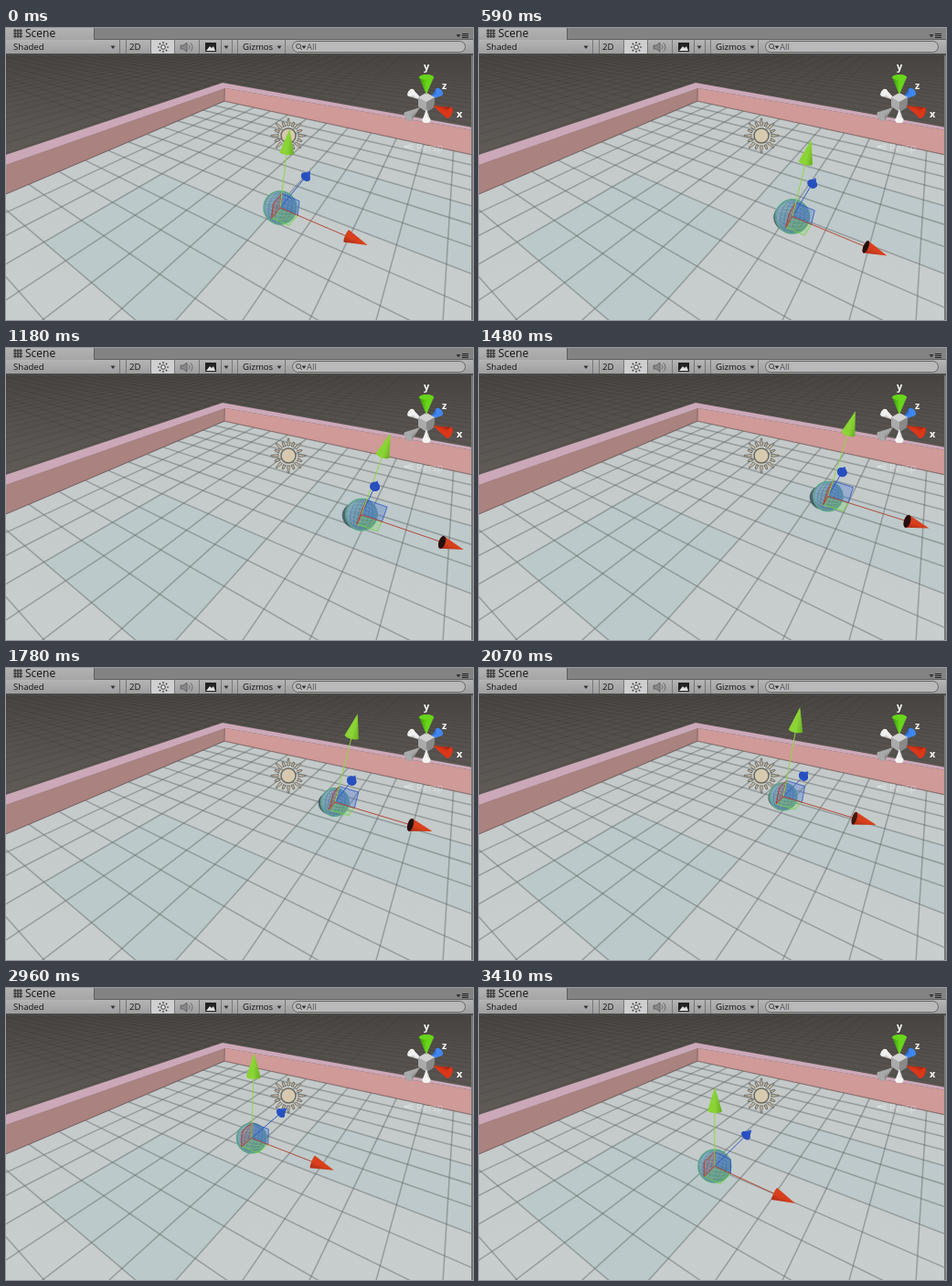
An HTML page with a canvas that plays this animation: 511x320 px, repeating every 3520 ms.

```html
<!DOCTYPE html>
<html>
<head>
<meta charset="utf-8">
<style>
html, body { margin: 0; width: 100%; height: 100%; overflow: hidden; background: #555; }
canvas { display: block; }
</style>
</head>
<body>
<canvas id="stage" width="511" height="320"></canvas>
<script>
const W = 511, H = 320, LOOP = 3520, TICK = 148.2, LEAD = 11.5;
const stage = document.getElementById('stage').getContext('2d');
const backdrop = document.createElement('canvas');
backdrop.width = W;
backdrop.height = H;
let g = backdrop.getContext('2d');

// Key points of the ball's path, three ticks apart
const keys = [
  [300, 197], [326, 206], [378, 202], [388, 172], [360, 147],
  [320, 141], [290, 153], [261, 172], [258, 204]
];

// Floor perspective: back corner, two vanishing points, tile steps
const corner = [239, 80], vanishX = [-270, -31], vanishZ = [500, -31];
const stepU = 0.03, stepV = 0.041;

const clamp = (v, lo, hi) => Math.min(hi, Math.max(lo, v));

function ballAt(tick) {
  const i = Math.floor(tick / 3), f = tick / 3 - i;
  const [a, b, c, d] = [-1, 0, 1, 2].map(k => keys[clamp(i + k, 0, keys.length - 1)]);
  return b.map((p, k) => p + f / 2 * (c[k] - a[k]
    + f * (2 * a[k] - 5 * p + 4 * c[k] - d[k] + f * (3 * (p - c[k]) + d[k] - a[k]))));
}

function floorPoint(u, v) {
  const s = u * stepU, t = v * stepV;
  return corner.map((c, i) => (c - s * vanishX[i] - t * vanishZ[i]) / (1 - s - t));
}

function trace(points, close = true) {
  g.beginPath();
  points.forEach(([x, y]) => g.lineTo(x, y));
  if (close) g.closePath();
}

function paint(fill, stroke, width) {
  if (fill) { g.fillStyle = fill; g.fill(); }
  if (stroke) { g.strokeStyle = stroke; g.lineWidth = width; g.stroke(); }
}

function poly(points, fill, stroke, width = 1) {
  trace(points);
  paint(fill, stroke, width);
}

function line(a, b, color, width = 1) {
  trace([a, b], false);
  paint(null, color, width);
}

function oval(x, y, rx, ry, angle, fill, stroke, width = 1) {
  g.beginPath();
  g.ellipse(x, y, rx, ry, angle, 0, Math.PI * 2);
  paint(fill, stroke, width);
}

function gradient(x0, y0, x1, y1, ...colors) {
  const fill = g.createLinearGradient(x0, y0, x1, y1);
  colors.forEach((c, i) => fill.addColorStop(i / (colors.length - 1), c));
  return fill;
}

function rect(x, y, w, h, fill) {
  g.fillStyle = fill;
  g.fillRect(x, y, w, h);
}

function text(str, x, y, size, color = '#111', weight = '') {
  g.font = `${weight} ${size}px "Open Sans", sans-serif`;
  g.fillStyle = color;
  g.fillText(str, x, y);
}

function cone(tip, angle, length, half, light, dark, depth, base) {
  g.save();
  g.translate(...tip);
  g.rotate(angle);
  const skin = gradient(0, -half, 0, half, light, light, dark);
  oval(-length, 0, depth, half, 0, skin);
  poly([[0, 0], [-length, -half], [-length, half]], skin);
  if (base) oval(-length, 0, depth, half, 0, base);
  g.restore();
}

function gridLines(from, to, color, width) {
  for (let i = from; i <= to; i++) {
    for (const [p, v] of [[floorPoint(i, 0), vanishZ], [floorPoint(0, i), vanishX]]) {
      const far = p.map((c, k) => c + (c - v[k]) * 12);
      line(from < 0 ? v : p, far, color, width);
    }
  }
}

function tilePatch(u0, u1, v0, v1, color) {
  poly([floorPoint(u0, v0), floorPoint(u1, v0), floorPoint(u1, v1), floorPoint(u0, v1)], color);
}

function drawRoom() {
  rect(0, 29, W, H, gradient(0, 30, 0, 140, '#4c4845', '#605b57'));
  gridLines(-28, 6, 'rgba(30,28,27,.18)', 0.8);

  g.save();
  trace([corner, [W, 139], [W, H], [0, H], [0, 182]]);
  g.clip();
  rect(0, 80, W, 240, gradient(0, 80, 0, H, '#c3c9c9', '#c8cdcd'));
  tilePatch(3, 7, 8, 12, '#bbc9ca');
  tilePatch(7, 11.5, 4, 7, '#bdc9ca');
  gridLines(0, 23, 'rgba(92,98,98,.46)', 1.5);
  g.restore();

  poly([[0, 150], [240, 66], corner, [0, 182]], '#aa8280');
  poly([[240, 66], [W, 112], [W, 139], corner], '#cf9a98');
  poly([[237, 60], [W, 109], [W, 112], [240, 66], [0, 150], [0, 139]], '#cba8b8');
  line([239, 66], corner, '#946c6d');
  line([0, 182], corner, 'rgba(80,60,60,.45)');
  line(corner, [W, 139], 'rgba(110,75,75,.45)');
  rect(509, 29, 2, H, '#777');
}

function drawSun() {
  g.save();
  g.translate(309, 118);
  for (let i = 0; i < 16; i++) {
    const reach = i % 2 ? 16 : 19;
    poly([[11, -1.4], [reach, -0.6], [reach, 0.6], [11, 1.4]], '#cfc5ae', '#625d54', 0.8);
    g.rotate(Math.PI / 8);
  }
  oval(0, 0, 8, 8, 0, '#d5cab0', '#6b655a', 1.4);
  g.restore();
}

function drawCompass() {
  const arm = (x, y, toX, toY, half, light, dark) =>
    cone([x, y], Math.atan2(y - toY, x - toX), Math.hypot(x - toX, y - toY), half, light, dark, 3, light);
  arm(457, 80, 443, 71, 4.5, '#f1f1f1', '#aaa');
  arm(462, 80, 474, 70, 5, '#3f86f0', '#2353ad');
  poly([[451, 76], [460, 71], [469, 76], [468, 87], [460, 92], [451, 86]], '#aaa');
  poly([[451, 76], [460, 71], [469, 76], [460, 81]], '#d2d2d2');
  poly([[460, 81], [469, 76], [468, 87], [460, 92]], '#898989');
  arm(460, 73, 460, 54, 8, '#68d51b', '#328d0a');
  arm(467, 85, 485, 93, 6.5, '#dc3618', '#8f1c0b');
  arm(453, 87, 440, 97, 6, '#a9a9a9', '#777');
  arm(460, 89, 460, 101, 4.5, '#f4f4f4', '#b5b5b5');
  text('y', 457, 46, 11, '#fff', 'bold');
  text('z', 477, 67, 11, '#fff', 'bold');
  text('x', 493, 98, 11, '#fff', 'bold');
  const faint = 'rgba(255,255,255,.4)';
  for (const dy of [-3, 0, 3]) line([436, 130], [446, 130 + dy], faint);
  text('Persp', 449, 135, 11, faint);
}

function arrow(x, y) {
  poly([[x - 2.5, y - 1.5], [x + 2.5, y - 1.5], [x, y + 2]], '#333');
}

function drawToolbar() {
  rect(0, 0, W, 13, '#838383');
  rect(0, 0, 97, 13, gradient(0, 0, 0, 13, '#b2b2b2', '#a5a5a5'));
  rect(96, 0, 1, 13, '#5c5c5c');
  rect(0, 13, W, 16, gradient(0, 13, 0, 29, '#b5b5b5', '#9d9d9d'));
  rect(97, 12, W, 1, '#606060');
  rect(0, 28, W, 2, '#4b4947');
  for (const d of [-3, 0, 3]) {
    line([13 + d, 1], [13 + d, 11], '#222');
    line([8, 6 + d], [18, 6 + d], '#222');
    line([499, 8.5 + d * 0.67], [506, 8.5 + d * 0.67], '#222');
  }
  text('Scene', 21, 10, 12);
  arrow(495, 8.5);

  rect(159, 13, 25, 15, '#cfcfcf');
  for (const x of [124, 131, 158, 184, 211, 235, 247, 253, 305]) rect(x, 13, 1, 15, '#777');
  text('Shaded', 8, 24, 9.6);
  text('2D', 135, 24, 9.6);
  text('Gizmos', 259, 24, 9.6);
  for (const x of [117, 241, 299]) arrow(x, 21);

  for (let i = 0; i < 8; i++) {
    const c = Math.cos(i * Math.PI / 4), s = Math.sin(i * Math.PI / 4);
    line([172 + c * 4, 21 + s * 4], [172 + c * 6, 21 + s * 6], '#333', 1.2);
  }
  oval(172, 21, 2.3, 2.3, 0, '#eee', '#333');
  poly([[191, 19], [194, 19], [198, 16], [198, 26], [194, 23], [191, 23]], '#888', '#666');
  for (const r of [3, 6]) {
    g.beginPath();
    g.arc(198, 21, r, -0.9, 0.9);
    g.stroke();
  }
  rect(218, 16, 12, 10, '#222');
  poly([[219, 25], [223, 20], [225, 22], [227, 20], [229, 25]], '#ddd');

  g.beginPath();
  g.roundRect(313.5, 14.5, 189, 12, 6);
  paint('#b9b9b9', '#666', 1);
  oval(320, 20, 2.5, 2.5, 0, null, '#444');
  line([322, 22], [324, 24], '#444');
  arrow(326, 21);
  text('All', 329, 24, 9.6, '#555');
}

function drawBall(x, y) {
  const r = 15 + (y - 141) * 0.055;
  const shade = clamp((x - 300) / 20, 0, 4);
  oval(x - shade, y + 1, r, r * 0.86, 0, 'rgba(42,68,82,.75)');
  oval(x, y, r, r, 0, gradient(x - r, y - r, x + r, y + r, '#8badbb', '#6a93a6', '#5b8582'));
  for (let k = 0.2; k < 1; k += 0.25) {
    oval(x, y, r * k, r, 0.25, null, 'rgba(50,96,160,.55)', 0.7);
    oval(x, y, r, r * k, 0.25, null, 'rgba(165,200,205,.5)', 0.7);
  }
  oval(x, y, r, r, 0, null, '#57a783', 1.3);
}

function drawHandles(x, y) {
  // Handle directions lean with the ball's place in the view
  const across = x - 257, near = y - 141;
  const up = [across * 0.24, -98 + near * 0.21];
  const right = [88 + across * 0.18, 31 + near * 0.18];
  const back = [35 - across * 0.15, -24 - near * 0.19];
  const at = (a, ka, b = [0, 0], kb = 0) => [x + a[0] * ka + b[0] * kb, y + a[1] * ka + b[1] * kb];
  const plane = (a, ka, b, kb, fill, edge) =>
    poly([[x, y], at(a, ka), at(a, ka, b, kb), at(b, kb)], fill, edge);
  const angle = v => Math.atan2(v[1], v[0]);

  plane(right, 0.2, back, -0.33, 'rgba(120,220,60,.2)', 'rgba(115,215,60,.8)');
  plane(right, 0.2, up, 0.18, 'rgba(55,105,220,.3)', 'rgba(45,85,195,.8)');
  plane(up, 0.18, back, -0.33, 'rgba(220,50,35,.18)', '#c03a2c');
  line([x, y], at(back, 0.9), '#3158c2');
  line([x, y], at(up, 0.78), '#91d744');
  line([x, y], at(right, 0.8), '#b3493b');
  const turn = clamp(across / 125, 0, 1);
  cone(at(back, 1.16), angle(back), 9 - turn * 2, 5.5, '#2e57cc', '#1a3794', 3.5 + turn * 1.5, '#284fc0');
  cone(at(up, 1), angle(up), 26, 7.8, '#8bd435', '#66ac20', 2.5);
  cone(at(right, 1), angle(right), 25, 7.2, '#d8401d', '#a82b14', 1 + turn * 2.6,
    `rgba(35,16,12,${clamp(turn * 3 - 1, 0, 1)})`);
}

drawRoom();
drawSun();
drawCompass();
drawToolbar();
g = stage;

function render(now) {
  const [x, y] = ballAt(Math.floor((now % LOOP + LEAD) / TICK));
  g.drawImage(backdrop, 0, 0);
  drawBall(x, y);
  drawHandles(x, y);
}

const start = performance.now();
function tick() {
  render(performance.now() - start);
  requestAnimationFrame(tick);
}
tick();
</script>
</body>
</html>
```
